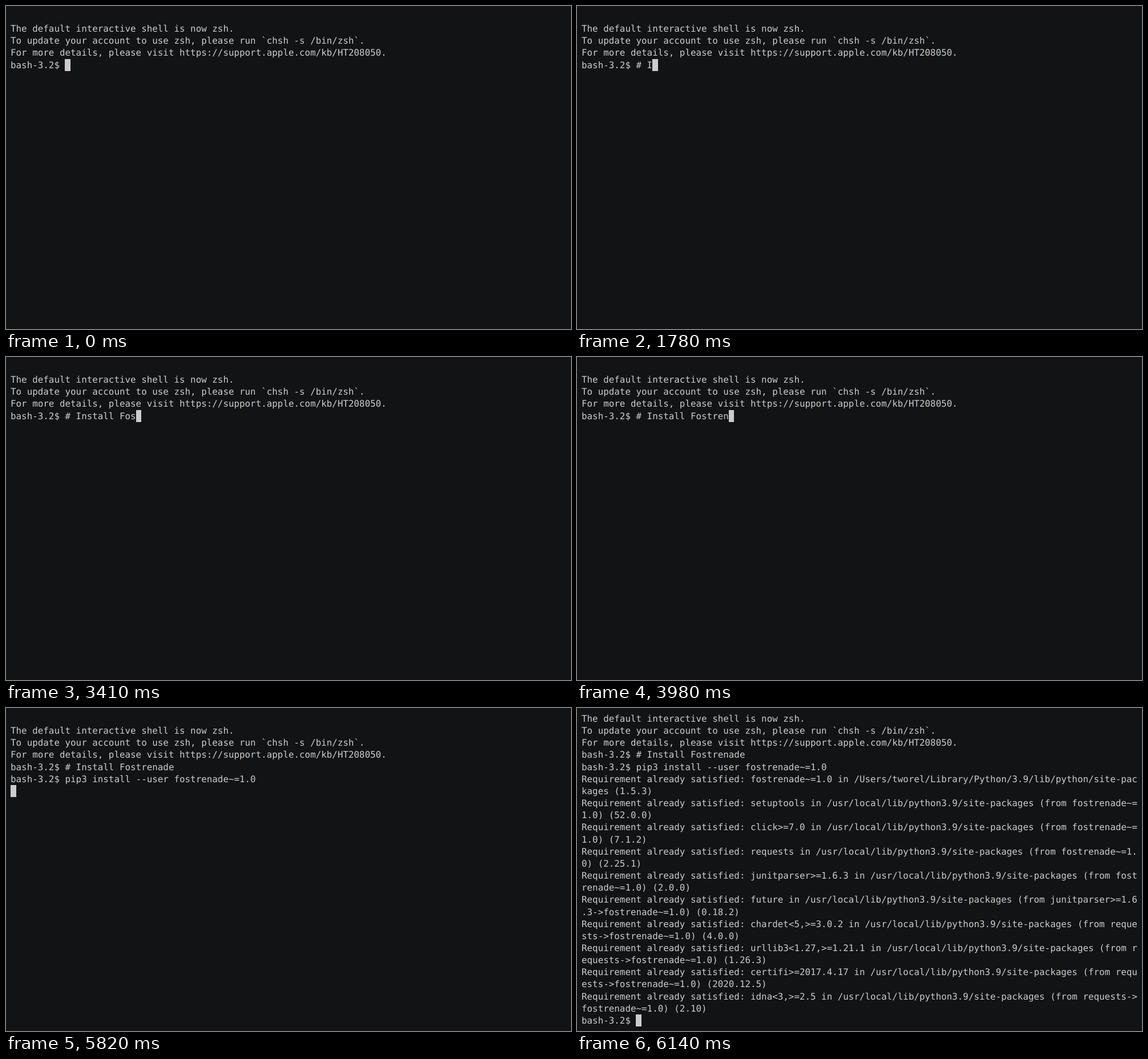
An HTML page for the animation above (8000 ms loop, 990 by 566 pixels).

```html
<!DOCTYPE html>
<html lang="en">
<head>
<meta charset="utf-8">
<title>Terminal session</title>
<style>
  html, body {
    margin: 0;
    width: 100%;
    height: 100%;
    overflow: hidden;
    background: #121314;
  }
  pre {
    position: absolute;
    left: 8px;
    top: 8px;
    margin: 0;
    color: #ccc;
    font: 15.861px/21.15px "DejaVu Sans Mono", monospace;
    font-variant-ligatures: none;
    text-rendering: geometricPrecision;
    white-space: pre;
  }
  #cursor {
    display: inline-block;
    width: 9.55px;
    height: 21.15px;
    vertical-align: top;
    background: #ccc;
  }
</style>
</head>
<body>
<pre><span id="text"></span><span id="cursor"></span></pre>
<script>
const LOOP = 8000, COLS = 102, ROWS = 26;
const PROMPT = 'bash-3.2$ ';
const PKG = 'fostrenade~=1.0';
const SITE = '/usr/local/lib/python3.9/site-packages';

const met = (name, version, parent, path = SITE) =>
  `Requirement already satisfied: ${name} in ${path}` +
  `${parent ? ` (from ${parent})` : ''} (${version})\n`;

const greeting = `
The default interactive shell is now zsh.
To update your account to use zsh, please run \`chsh -s /bin/zsh\`.
For more details, please visit https://support.apple.com/kb/HT208050.
`;

const output = [
  met(PKG, '1.5.3', '', '/Users/tworel/Library/Python/3.9/lib/python/site-packages'),
  met('setuptools', '52.0.0', PKG),
  met('click>=7.0', '7.1.2', PKG),
  met('requests', '2.25.1', PKG),
  met('junitparser>=1.6.3', '2.0.0', PKG),
  met('future', '0.18.2', `junitparser>=1.6.3->${PKG}`),
  met('chardet<5,>=3.0.2', '4.0.0', `requests->${PKG}`),
  met('urllib3<1.27,>=1.21.1', '1.26.3', `requests->${PKG}`),
  met('certifi>=2017.4.17', '2020.12.5', `requests->${PKG}`),
  met('idna<3,>=2.5', '2.10', `requests->${PKG}`)
].join('');

const comment = '# Install Fostrenade';
const keyTimes = [
  1060, 1520, 1780, 1970, 2100, 2360, 2560, 2690, 2820, 2950,
  3150, 3280, 3410, 3600, 3660, 3850, 3980, 4110, 4310, 4370
];

// Each event appends its text to the terminal at the given time.
const events = [
  [0, greeting + PROMPT],
  ...keyTimes.map((time, i) => [time, comment[i]]),
  [4630, '\n' + PROMPT],
  [5160, `pip3 install --user ${PKG}`],
  [5820, '\n'],
  [6080, output],
  [6140, PROMPT]
];

const wrap = new RegExp(`.{${COLS}}(?=.)`, 'g');
const textNode = document.getElementById('text');
let shown = 0;

function screen(count) {
  const log = events.slice(0, count).map(event => event[1]).join('');
  return log.replace(wrap, '$&\n').split('\n').slice(-ROWS).join('\n');
}

function draw() {
  const time = performance.now() % LOOP;
  const count = events.filter(event => event[0] <= time).length;
  if (count !== shown) {
    textNode.textContent = screen(count);
    shown = count;
  }
  requestAnimationFrame(draw);
}
draw();
</script>
</body>
</html>
```
